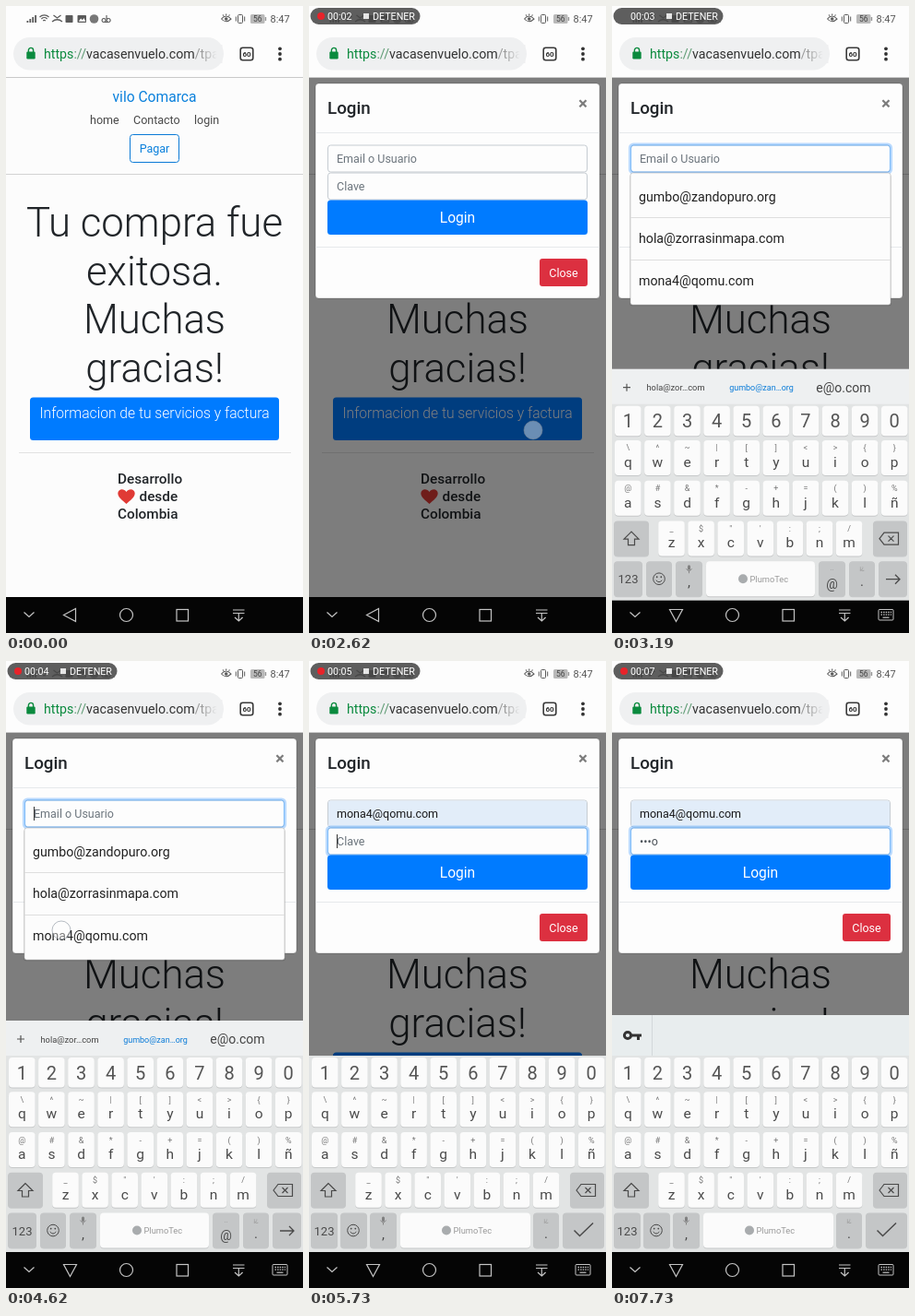
Write an HTML page that moves like this. It is 322 px wide and 680 px high and loops after 8 s.

```html
<!DOCTYPE html>
<html lang="es">
<head>
<meta charset="utf-8">
<title>Login</title>
<style>
html, body { margin: 0; width: 100%; height: 100%; overflow: hidden; background: #fcfcfc; }
svg { display: block; position: absolute; left: 0; top: 0; font-family: Roboto, sans-serif; }
text { white-space: pre; }
</style>
</head>
<body>
<svg id="stage" width="322" height="680" viewBox="0 0 322 680"></svg>
<script>
const LOOP = 8000;
const NS = 'http://www.w3.org/2000/svg';
const stage = document.getElementById('stage');
let cur = stage;

function el(tag, attrs) {
  const n = document.createElementNS(NS, tag);
  for (const k in attrs) n.setAttribute(k, attrs[k]);
  cur.appendChild(n);
  return n;
}
function group(build) {
  const up = cur, g = el('g', {});
  cur = g;
  build();
  cur = up;
  return g;
}
const box = (x, y, w, h, fill, rx = 0, more = {}) =>
  el('rect', { x, y, width: w, height: h, fill, rx, ...more });
const line = (d, stroke, width = 1, more = {}) =>
  el('path', { d, stroke, 'stroke-width': width, fill: 'none', ...more });
const shape = (d, fill) => el('path', { d, fill });
const dot = (cx, cy, r, fill, more = {}) => el('circle', { cx, cy, r, fill, ...more });
function label(x, y, str, size, fill, weight = 400, anchor = 'start') {
  const n = el('text', { x, y, 'font-size': size, fill, 'font-weight': weight, 'text-anchor': anchor });
  n.textContent = str;
  return n;
}
const mid = (x, y, str, size, fill, weight) => label(x, y, str, size, fill, weight, 'middle');

const BLUE = '#007bff', INK = '#212529', MUTE = '#6c757d', ICON = '#5a5a5a';
const MAIL = 'mona4@qomu.com';

// ---------- web page ----------
box(0, 0, 322, 680, '#fcfcfc');
mid(161, 104, 'vilo Comarca', 15.6, '#0a80dc');
label(91, 128, 'home', 12.5, '#484848');
label(138, 128, 'Contacto', 12.5, '#484848');
label(204, 128, 'login', 12.5, '#484848');
box(134.5, 139.5, 53, 30, 'none', 3, { stroke: '#0a7ad6' });
mid(161, 159, 'Pagar', 12.5, '#0a80dc');
line('M0 182.5H322', '#d2d2d2');
['Tu compra fue', 'exitosa.', 'Muchas', 'gracias!'].forEach((s, i) =>
  mid(161, 250 + i * 52.5, s, 43.75, INK, 300));
box(26, 424.5, 270, 46.5, BLUE, 3.5);
mid(161, 447, 'Informacion de tu servicios y factura', 15.63, '#fff', 300);
line('M14 484.5H309', '#e2e2e2');
label(121, 518, 'Desarrollo', 15.3, INK, 500);
label(144.5, 537, 'desde', 15.3, INK, 500);
label(121, 556, 'Colombia', 15.3, INK, 500);
shape('M130.5 540C126 536 121.3 533 121.3 528.6C121.3 523.4 128 522.6 130.5 527C133 522.6 139.7 523.4 139.7 528.6C139.7 533 135 536 130.5 540Z', '#e03a35');

const backdrop = box(0, 78, 322, 563, '#000');

// ---------- modal ----------
let mailText, mailHint, passText, passHint, mailFill, mailGlow, passGlow;
function field(y) {
  return box(20.5, y, 281, 29, '#fdfdfd', 3, { stroke: '#c6ccd2' });
}
function glow(y) {
  return group(() => {
    box(19.2, y - 1.3, 283.6, 31.6, 'none', 4, { stroke: BLUE, 'stroke-opacity': .27, 'stroke-width': 2.6 });
    box(20.5, y, 281, 29, 'none', 3, { stroke: '#7ab9f8' });
  });
}
const modal = group(() => {
  box(7, 84, 308, 233, '#fdfdfd', 3.5, { stroke: '#000', 'stroke-opacity': .2 });
  label(20, 117, 'Login', 18.75, INK, 500);
  mid(297, 112, '×', 18.75, '#7c7c7c', 700);
  line('M7 137.5H315M7 261.5H315', '#e6e9ec');
  field(151);
  mailFill = box(21, 151.5, 280, 28, '#e2edf9', 2.5);
  mailHint = label(30, 169.5, 'Email o Usuario', 12.5, MUTE);
  mailText = label(30, 169.5, MAIL, 12.5, '#1c1c1c');
  field(181);
  mailGlow = glow(151);
  passGlow = glow(181);
  passHint = label(30, 199.5, 'Clave', 12.5, MUTE);
  passText = label(30, 199.5, '', 12.5, '#495057');
  box(20, 210.5, 282, 37.5, BLUE, 3.5);
  mid(161, 235, 'Login', 15.6, '#fff');
  box(250, 274, 52, 30, '#dc3040', 3);
  mid(276, 293.5, 'Close', 12.5, '#fff');
});
const caret = line('M0 0V15', '#333');

// ---------- autofill list ----------
const list = group(() => {
  box(19, 182.5, 284, 143, '#000', 3, { opacity: .12 });
  box(20, 181, 282, 143, '#fcfcfc', 2.5, { stroke: '#b8b8b8', 'stroke-width': .6 });
  line('M20 229.5H302M20 275.5H302', '#dedede');
  ['gumbo@zandopuro.org', 'hola@zorrasinmapa.com', MAIL].forEach((s, i) =>
    label(29, 211.7 + i * 45.5, s, 14.2, '#222'));
});

// ---------- browser bar and status icons ----------
box(0, 0, 322, 77, '#fdfdfd');
line('M0 77.5H322', '#c9c9c9');
box(8, 34, 228, 35.5, '#eff0f1', 17.7);
box(22.3, 49.5, 9.4, 8, '#0b8a3e', 1.2);
line('M24.4 50V48a2.6 2.6 0 0 1 5.2 0V50', '#0b8a3e', 1.4);
const url = label(41, 57, '', 14.2, '#333');
[['https', '#0b8a3e'], ['://', '#5c9a72'], ['vacasenvuelo.com', '#333'], ['/tpa', '#999']].forEach(([s, fill]) => {
  cur = url;
  el('tspan', { fill }).textContent = s;
  cur = stage;
});
const fade = el('linearGradient', { id: 'fade' });
cur = fade;
el('stop', { offset: 0, 'stop-color': '#eff0f1', 'stop-opacity': 0 });
el('stop', { offset: 1, 'stop-color': '#eff0f1' });
cur = stage;
box(212, 42, 17, 20, 'url(#fade)');
box(228.5, 42, 6, 20, '#eff0f1');
box(254.2, 45.2, 13.6, 13.6, 'none', 2.5, { stroke: '#3a3a3a', 'stroke-width': 1.6 });
mid(261, 55, '60', 8, '#333', 700);
[46.3, 52, 57.7].forEach(y => dot(297, y, 1.9, '#333'));

[0, 1, 2, 3].forEach(i => box(22.5 + i * 2.9, 16 - i * 2, 1.8, 2 + i * 2, ICON));
line('M36.5 12a7 7 0 0 1 10 0M38.4 14a4.4 4.4 0 0 1 6.2 0M40.2 16a2 2 0 0 1 2.6 0', ICON, 1.2);
line('M50 17q5.5-4.5 11 0M51.5 10l4 3 4-3', ICON, 1.3);
box(64.5, 10, 8, 8, ICON, .8);
box(77.5, 10, 9.5, 8, ICON, .8);
shape('M78.7 16.7l2.4-3.2 1.8 1.7 1.6-2.3 1.8 3.8Z', '#fdfdfd');
dot(95.5, 14, 4.8, '#777');
line('M106 17.5a2 2 0 1 1 .1 0h5a2 2 0 1 1 .1 0M109 14V10', ICON, 1.1);
line('M233.5 14q5-6 10.5 0q-5.5 5.5-10.5 0M235 9.5l1 1.2M238.7 8.5V10M242.5 9.5l-1 1.2', ICON, 1.1);
dot(238.7, 14, 1.8, ICON);
box(251.5, 9.5, 5, 9, 'none', 1, { stroke: ICON });
line('M249.3 11.5V16.5M258.7 11.5V16.5', ICON);
box(265, 9, 15.5, 10, '#b9b9b9', 1.5);
box(280.7, 12, 1.5, 4, '#999');
mid(272.8, 17, '56', 8.5, '#444');
label(286.5, 18, '8:47', 11, '#555');

// ---------- keyboard ----------
box(0, 641, 322, 39, '#050505');
const PITCH = 32.1, KEY = '#fbfbfb', DARK = '#c4c6c7', GLYPH = '#4a4a4a';
const ROW = i => 467.3 + i * 43.75;
const pressed = {};
function key(x, y, w, h, fill = KEY) {
  box(x, y + 1, w, h, '#c6c8c9', 4);
  return box(x, y, w, h, fill, 4);
}
function letters(str, marks, x0, y) {
  [...str].forEach((c, i) => {
    const cx = x0 + i * PITCH;
    pressed[c] = key(cx - 14.3, y, 28.6, 38);
    mid(cx, y + 11.5, marks[i], 9, '#777');
    mid(cx, y + 29, c, 15.5, GLYPH);
  });
}
function bottomRow(keys, space, period, face, brandX) {
  const y = ROW(3), cy = y + 19;
  keys.forEach(([x, w]) => key(x, y, w, 38, DARK));
  key(space[0], y, space[1], 38);
  mid(keys[0][0] + keys[0][1] / 2, cy + 5, '123', 13, GLYPH);
  dot(face, cy, 6.3, 'none', { stroke: GLYPH });
  line(`M${face - 3.3} ${cy + 1.5}q3.3 4 6.6 0`, GLYPH);
  dot(face - 2.3, cy - 2, .9, GLYPH);
  dot(face + 2.3, cy - 2, .9, GLYPH);
  const mic = keys[2][0] + keys[2][1] / 2;
  box(mic - 1.5, y + 4, 3, 5.5, '#808080', 1.5);
  line(`M${mic - 3} ${y + 8}q3 5 6 0M${mic} ${y + 10.5}v2.5`, '#808080', .9);
  mid(mic, y + 28, ',', 15, GLYPH);
  dot(brandX, cy, 5, '#a9acae');
  label(brandX + 7.5, cy + 3.5, 'PlumoTec', 9.3, '#999');
  mid(period, y + 10, '¡¿', 8, '#999');
  mid(period, y + 27, '.', 15, GLYPH);
}
let sugg, words, passBar, mailRow, passRow;
const keyboard = group(() => {
  sugg = group(() => {
    box(0, 390, 322, 39, '#eef0f1');
    line('M12 410H20M16 406V414', '#555', 1.2);
    words = group(() => {
      mid(69, 413.5, 'hola@zor…com', 9.3, '#444');
      mid(162, 413.5, 'gumbo@zan…org', 9, '#0a7bd8');
      mid(251, 415, 'e@o.com', 14, '#444');
    });
  });
  passBar = group(() => {
    box(0, 384, 322, 45, '#e8edee');
    line('M43.5 384V428', '#d3d8da');
    dot(17, 406, 3.6, 'none', { stroke: '#333', 'stroke-width': 3 });
    line('M21 406H32M28.5 406V411', '#333', 3);
  });
  box(0, 428, 322, 213, '#e2e4e4');
  [...'1234567890'].forEach((c, i) => {
    key(3 + i * PITCH, 430, 28.6, 32.5);
    mid(17.3 + i * PITCH, 453.5, c, 20, '#555');
  });
  letters('qwertyuiop', '\\^~|[]<>{}', 17.3, ROW(0));
  letters('asdfghjklñ', '@#&*-+=()%', 17.3, ROW(1));
  letters('zxcvbnm', '_$"\':;/', 64.5, ROW(2));
  key(2, ROW(2), 38, 38, DARK);
  line('M21 566.5l-8 8h4.5v6.5h7V574.5h4.5Z', GLYPH, 1.2);
  key(283, ROW(2), 37, 38, DARK);
  line('M290 574l5-6.5h15.5v13H295ZM299.5 571l6 6M305.5 571l-6 6', GLYPH, 1.2);
  mailRow = group(() => {
    bottomRow([[2, 31], [37, 28], [69, 29], [224, 29], [257, 28], [289, 31]], [102, 118], 271, 51, 142);
    mid(238.5, 608.5, '..', 8, '#999');
    mid(238.5, 628, '@', 14, GLYPH);
    line('M297 618H312M307 613l5 5-5 5', GLYPH, 1.3);
  });
  passRow = group(() => {
    bottomRow([[2, 29], [34, 29], [66, 29], [243, 28], [275, 45]], [99, 141], 257, 48, 149);
    line('M287.5 617.5l6 6 14.5-14', GLYPH, 1.5);
  });
});

// ---------- system bar icons, above the sliding keyboard ----------
const NAV = '#c4c4c4';
line('M19.5 657.5l5.5 5 5.5-5', NAV, 1.2);
const backLeft = line('M62.5 660.5L75.5 653.5V667.5Z', NAV, 1.2);
const backDown = group(() => {
  line('M62.5 654.5H76.5L69.5 667.5Z', NAV, 1.2);
  box(289, 654.5, 16, 11.5, 'none', 1, { stroke: NAV });
  line('M291.5 657.5H303M291.5 660.2H303', NAV, 1.3, { 'stroke-dasharray': '1.5 1.1' });
  line('M293.5 663.2H300.5', NAV, 1.2);
});
dot(130.5, 660.5, 7, 'none', { stroke: NAV, 'stroke-width': 1.2 });
box(185, 654.5, 12.5, 12.5, 'none', 0, { stroke: NAV, 'stroke-width': 1.2 });
line('M246 655H258.5M246 658.5H258.5M252.3 658.5V667M248 663l4.3 4 4.3-4', NAV, 1.2);

// ---------- touch marker and recorder pill ----------
const touch = dot(0, 0, 10, '#fff', { 'fill-opacity': .42, stroke: '#7d8894', 'stroke-opacity': .55 });
let clock, lamp;
const pill = group(() => {
  box(1.5, 2, 119, 18, '#444', 9, { opacity: .86 });
  lamp = dot(13, 11, 4, '#e8232a');
  clock = label(20, 14.8, '', 10.7, '#fff');
  box(59, 8, 6, 6, '#e6e6e6');
  label(69, 14.8, 'DETENER', 10.7, '#fff');
});

// ---------- timeline ----------
const ramp = (t, a, b) => Math.min(1, Math.max(0, (t - a) / (b - a)));
const ease = p => 1 - (1 - p) ** 3;
const within = (t, a, b) => t >= a && t < b;
const show = (n, on) => n.setAttribute('display', on ? 'inline' : 'none');

const TICKS = [1040, 2080, 3110, 4080, 5080, 6040, 7100];
const KEYS = [['d', 6460], ['e', 6660], ['m', 6870], ['o', 7070]];
// x, y, down, up
const TAPS = [
  [243, 460, 2380, 2660], [130, 166, 2840, 2960], [60, 292, 4460, 4700], [150, 196, 5120, 5360],
  [81, 533, 6460, 6550], [81, 486, 6660, 6750], [225, 580, 6870, 6960], [272.5, 467, 7070, 7210]
];
const FILL = 4760, FOCUS = 2960, NEXT = 5400, SWAP = 5520;
// on, off, top, text it follows
const CARETS = [
  [FOCUS, 3080, 158], [3580, 4090, 158], [4580, FILL, 158],
  [4820, 5080, 158, mailText], [5540, 6050, 188], [6460, 7730, 188, passText]
];

function render(t) {
  pill.setAttribute('opacity', ramp(t, 40, 200));
  const sec = TICKS.filter(x => t >= x).length;
  clock.textContent = '00:0' + sec;
  show(lamp, t >= (sec ? TICKS[sec - 1] : 40) + 500);

  const open = ramp(t, 2420, 2610);
  backdrop.setAttribute('opacity', .5 * open);
  modal.setAttribute('opacity', open);
  modal.setAttribute('transform', `translate(0 ${-39 * (1 - ease(open))})`);

  const filled = t >= FILL;
  show(mailFill, filled);
  show(mailText, filled);
  show(mailHint, !filled);
  mailGlow.setAttribute('opacity', ramp(t, FOCUS, FOCUS + 120) * (1 - ramp(t, NEXT, NEXT + 120)));
  passGlow.setAttribute('opacity', ramp(t, NEXT, NEXT + 120));
  show(list, within(t, 3180, FILL));

  const typed = KEYS.filter(k => t >= k[1]);
  const n = typed.length;
  passText.textContent = n ? '•'.repeat(n - 1) + typed[n - 1][0] : '';
  show(passHint, !n);
  for (const [c, at] of KEYS) pressed[c].setAttribute('fill', within(t, at, at + 110) ? '#d3d6d8' : KEY);

  const c = CARETS.find(r => within(t, r[0], r[1]));
  show(caret, !!c);
  if (c) {
    const x = 30.5 + (c[3] ? Math.round(c[3].getComputedTextLength()) : 0);
    caret.setAttribute('transform', `translate(${x} ${c[2]})`);
  }

  const up = ease(ramp(t, 3040, 3240));
  show(keyboard, up > 0);
  keyboard.setAttribute('transform', `translate(0 ${250 * (1 - up)})`);
  const pass = t >= SWAP;
  show(sugg, !pass);
  show(words, t < 4820);
  show(passBar, t >= 5810);
  show(mailRow, !pass);
  show(passRow, pass);
  show(backLeft, t < 3100);
  show(backDown, t >= 3100);

  const tap = TAPS.find(p => within(t, p[2], p[3] + 160));
  show(touch, !!tap);
  if (tap) {
    touch.setAttribute('cx', tap[0]);
    touch.setAttribute('cy', tap[1]);
    touch.setAttribute('opacity', 1 - ramp(t, tap[3], tap[3] + 160));
  }
}

const start = performance.now();
function tick() {
  render((performance.now() - start) % LOOP);
  requestAnimationFrame(tick);
}
tick();
</script>
</body>
</html>
```
